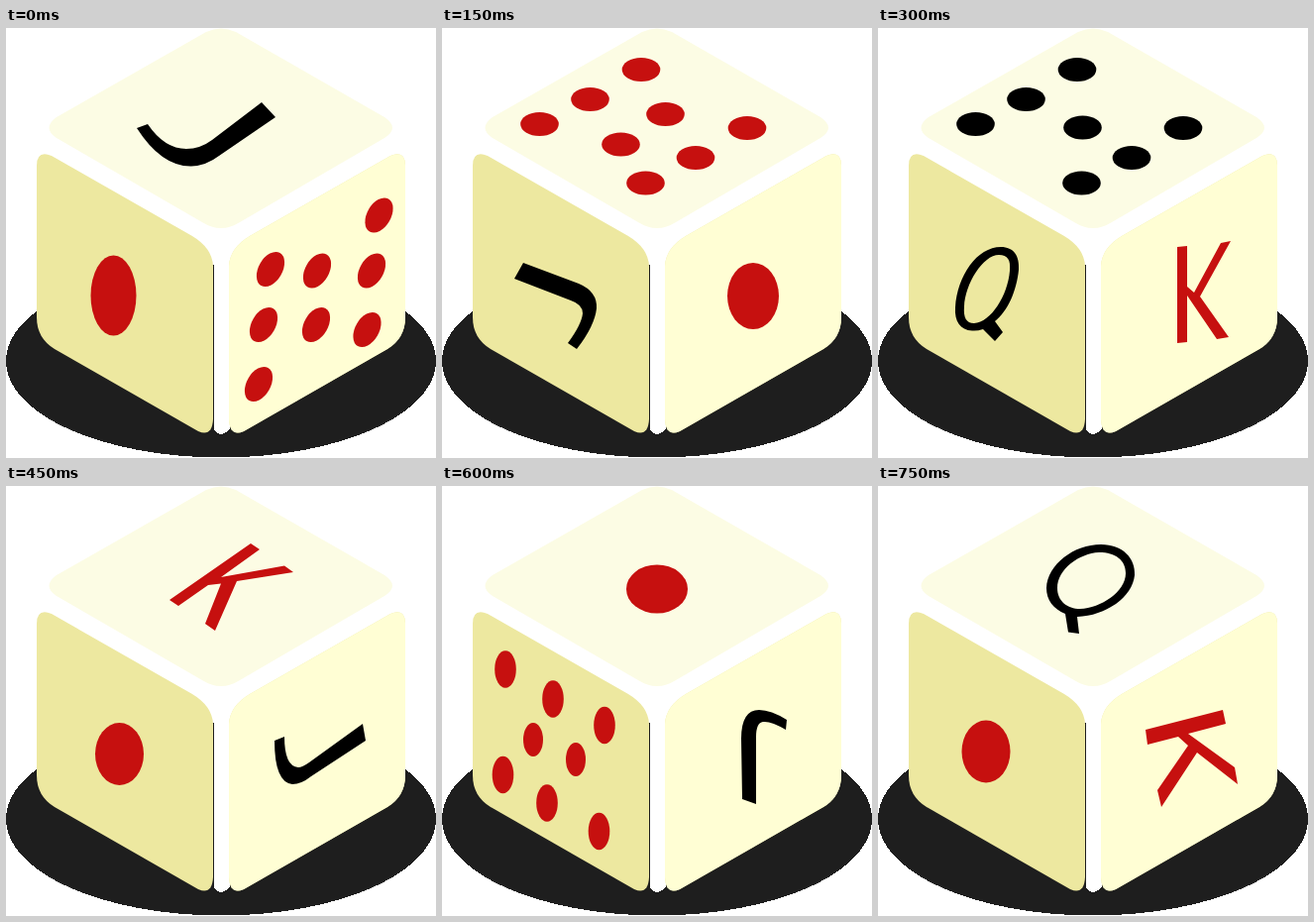
An HTML page for the animation above (0.9 s loop, 434 by 434 pixels).

```html
<!DOCTYPE html>
<html lang="en">
<head>
<meta charset="utf-8">
<title>Rolling poker die</title>
<style>
  html, body { margin: 0; width: 100%; height: 100%; overflow: hidden; background: #fff; }
  svg { display: block; width: 100vw; height: 100vh; }
</style>
</head>
<body>
<svg viewBox="0 0 434 434">
  <g shape-rendering="crispEdges">
    <ellipse cx="217" cy="336" rx="217" ry="97.5" fill="#1e1e1e"/>
    <path fill="#fff" d="M210 200H226V405Q217 414 210 406Z"/>
  </g>
  <path fill="#fcfce4" d="M202 4Q217 -3 232 4L382 90Q398 101 382 111L236 196Q217 208 198 196L51 111Q36 101 51 90Z"/>
  <path id="side" fill="#ede8a0" d="M31 139Q31 123 46 129L188 210Q208 222 209 240V395Q208 413 194 407L49 324Q31 313 31 292Z"/>
  <use href="#side" id="right" transform="matrix(-1 0 0 1 434 0)"/>
  <path fill="#fffed4" transform="matrix(-1 0 0 1 434 0)" d="M31 139Q31 123 46 129L188 210Q208 222 209 240V395Q208 413 194 407L49 324Q31 313 31 292Z"/>
  <g id="marks"></g>
</svg>
<script>
const RED = '#c6100f', BLACK = '#000';
const STEP = 150;

const shape = (color, d) => `<path fill="${color}" fill-rule="evenodd" d="${d}"/>`;
const pip = (color, rx, ry, x, y, tilt = 0) =>
  `<ellipse fill="${color}" rx="${rx}" ry="${ry}" transform="translate(${x} ${y}) rotate(${tilt})"/>`;
const pips = (color, rx, ry, points, tilt) =>
  points.map(([x, y]) => pip(color, rx, ry, x, y, tilt)).join('');

// Pips shared by both top faces that show a number
const topPips = [[201, 42], [149.5, 72], [98.5, 97], [308, 101], [256, 131], [205.5, 156.5]];

// Each pose lists the marks on the top, left and right faces
const poses = [
  [
    shape(BLACK, 'M132 101L143 97Q160 122 182 122Q196 122 208 113L258 75L272 90L215 129Q202 139 187 139.5Q157 140 132 101Z'),
    pip(RED, 23, 40.5, 108.5, 270),
    pips(RED, 12, 19, [[376.5, 189], [267, 243.5], [314, 245], [369, 245],
      [260, 299.5], [313, 299.5], [364.5, 304.5], [255, 359.5]], 30)
  ],
  [
    pips(RED, 19.3, 12, [...topPips, [225.5, 87], [180.5, 117.5]]),
    shape(BLACK, 'M82 237L138 258Q157 266 156 283Q154 301 136 324L127 318Q141 299 142 288Q142 279 130 275L73 253Z'),
    pip(RED, 26, 33.5, 314, 270.5)
  ],
  [
    pips(BLACK, 19.3, 12, [...topPips, [206.5, 100.5]]),
    shape(BLACK, 'M124 221C137 221 143 230 142 244C140 265 131 286 118 296L126 307L118 316L106 304Q100 306 95 305.5C83 305 77 296 78 282C80 250 100 221 124 221ZM122 229C106 229 88 258 87 281C86 292 89 298 97 298C114 297 131 270 133 245C134 234 131 229 122 229Z'),
    shape(RED, 'M302 221L312 220V261L319 267L346 217L356 215L325 271L354 312L342 314L312 270V317L302 318Z')
  ],
  [
    shape(RED, 'M165 115L247 58L256 64L217 92L281 80.5L290 87L233 96L211 146L201 139L217 98.5L204 100L174 121Z'),
    pip(RED, 24.5, 31.5, 114.5, 270.5),
    shape(BLACK, 'M271 257L281 253Q281 283 295 284Q299 284 306 279L360 240L363 257L308 293Q298 301 289 301Q271 299 271 257Z')
  ],
  [
    pip(RED, 31, 24.5, 217, 104),
    pips(RED, 10.8, 18.7, [[64, 185], [112, 215], [164, 241.5], [61.5, 291.5], [106, 320], [158.5, 348.5]]) +
      pips(RED, 10, 17, [[92, 256], [135, 276]]),
    shape(BLACK, 'M303 316L302 255Q302 226 320 226Q332 226 348 236L347 246Q332 237 324 238Q317 239 317 253V321Z')
  ],
  [
    shape(BLACK, 'M225 59C247 59 260 73 259 90C257 112 230 131 201 132L203 149L192 147.5L189 129C177 124 170 115 170 103C171 79 198 59 225 59ZM223 67C203 68 181 84 181 103C181 116 191 124 204 124C225 123 250 107 250 88C250 75 240 67 223 67Z'),
    pip(RED, 24.5, 31.5, 109, 268),
    shape(RED, 'M270 246L348 226L351 240L313 250L360 284L363 301L322 269L286 324L282 307L313 262L303 253L272 261Z')
  ]
].map(faces => faces.join(''));

const marks = document.getElementById('marks');
let shown = -1;

function draw() {
  const pose = Math.floor(performance.now() / STEP) % poses.length;
  if (pose !== shown) marks.innerHTML = poses[shown = pose];
  requestAnimationFrame(draw);
}
draw();
</script>
</body>
</html>
```
